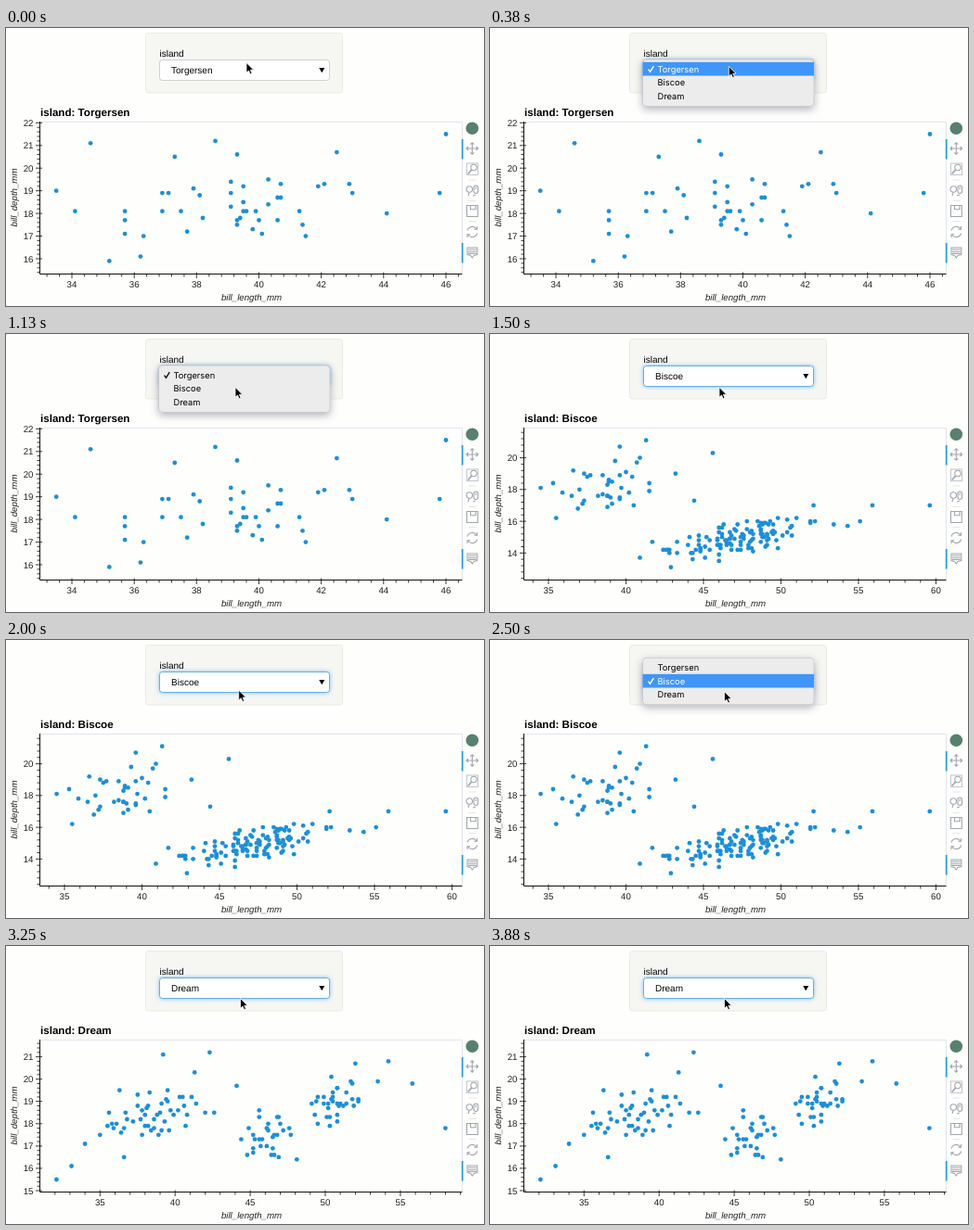
An HTML page that plays this animation: 515 by 300 pixels, repeating every 4.01 s.

```html
<!DOCTYPE html>
<html lang="en">
<head>
<meta charset="utf-8">
<title>Island scatter plot</title>
<style>
html, body { margin: 0; width: 100%; height: 100%; overflow: hidden; background: #fefefc; }
svg { display: block; width: 515px; height: 300px; text-rendering: geometricPrecision; }
text { font-family: "Liberation Sans", Arial, sans-serif; font-size: 10px; fill: #000; }
.title { font-size: 11.6px; font-weight: bold; }
.axis { font-size: 9.7px; font-style: italic; fill: #222; text-anchor: middle; }
.tick { font-size: 9.7px; fill: #222; }
.item { font-family: Inter, sans-serif; font-size: 9.3px; }
.icon { fill: none; stroke: #a1a6ae; stroke-width: 1.1; }
</style>
</head>
<body>
<svg viewBox="0 0 515 300">
  <defs>
    <filter id="shadow" x="-15%" y="-40%" width="130%" height="190%">
      <feDropShadow dx="0" dy="3" stdDeviation="4.5" flood-color="#10102a" flood-opacity=".3"/>
    </filter>
    <filter id="glow" x="-10%" y="-40%" width="120%" height="180%">
      <feDropShadow dx="0" dy="0" stdDeviation="1.9" flood-color="#66afe9" flood-opacity=".85"/>
    </filter>
  </defs>
  <rect width="515" height="300" fill="#fefefc"/>
  <rect x="150.5" y="5.5" width="212" height="64.5" rx="3" fill="#f6f6f3" stroke="#ebebe0"/>
  <text x="165.5" y="31">island</text>
  <rect id="box" x="165.5" y="34.5" width="183" height="22" rx="3" fill="#fff"/>
  <text id="value" x="178" y="49"></text>
  <path d="M337.3 43h6l-3 5.2z"/>

  <text id="title" class="title" x="37" y="95"></text>
  <path d="M37 101.5H491.5V265" fill="none" stroke="#e3e3ee"/>
  <g id="plot"></g>
  <path d="M36.5 101V265.5H491.5" fill="none" stroke="#111"/>
  <text class="axis" x="264.5" y="294">bill_length_mm</text>
  <text class="axis" transform="translate(11.5 183) rotate(-90)">bill_depth_mm</text>

  <path d="M491.7 120v21.5M491.7 232v21.5" stroke="#26a0da" stroke-width="1.8"/>
  <circle cx="502.3" cy="108.3" r="6.8" fill="#57806f"/>
  <path d="M498.5 164h8M498.5 186.5h8M498.5 208.5h8" stroke="#e6e6e8"/>
  <g class="icon">
    <path d="M496 130h12.6M502.3 123.7v12.6M498 128l-2 2 2 2M506.600 128l2 2-2 2M500.300 125.700l2-2 2 2M500.300 134.300l2 2 2-2"/>
    <rect x="496.500" y="146" width="12" height="12.500" stroke="#c4c8ce"/>
    <circle cx="504" cy="150.500" r="3.200"/><path d="M501.700 153l-4 4.500" stroke-width="1.800"/>
    <circle cx="499.300" cy="174" r="3.200"/><path d="M499 177.500l-1 3.500"/>
    <rect x="504" y="170" width="4.500" height="8.500" rx="2.200"/><path d="M506.200 171.500v2.500M503 181l3-1"/>
    <path d="M496.500 191.500h11.800v12h-11.800zM500.500 191.700v4h5.500v-4"/>
    <path d="M497 218.500a5.500 5.500 0 0 1 10-1.500M507.600 221.500a5.500 5.500 0 0 1-10 1.500M507.500 214v3.200h-3.200M497 226v-3.200h3.200"/>
    <path d="M497 237h10.800v7.500l-3.800 1-1.700 2.500-1.700-2.500-3.600-1zM498 239h8.800M498 241.200h8.800M498 243.400h8.800"/>
  </g>

  <g id="menu">
    <rect x="164.5" width="184.500" height="50.500" rx="4" fill="#ececec" stroke="#bfbfc4" stroke-width=".7" filter="url(#shadow)"/>
    <rect id="bar" x="164.500" width="184.500" height="14.700" fill="#3f95f8"/>
    <path id="check" fill="none" stroke-width="1.400"/>
    <g id="items"></g>
  </g>
  <path id="cursor" d="M0 0V10.800L2.500 8.500 4.200 12.300 6 11.500 4.400 7.800H7.800Z" fill="#000" stroke="#fff" stroke-width=".8"/>
</svg>
<script>
const LOOP = 4010, STEP = 125, ROW = 14.8;
const get = id => document.getElementById(id);

function random(seed) {
  return () => (seed = seed * 16807 % 2147483647) / 2147483647;
}

// Bell-shaped cloud: evenly ranked radii, random angles, depth rising with length
function cloud({ seed, count, mean, spread, slope }) {
  const rand = random(seed * 7919);
  return Array.from({ length: count }, (_, i) => {
    const r = Math.sqrt(-2 * Math.log(1 - 0.9 * (i + 0.5) / count));
    const angle = 2 * Math.PI * rand();
    const dx = spread[0] * r * Math.cos(angle);
    const dy = slope * dx + spread[1] * r * Math.sin(angle);
    return [mean[0] + dx, mean[1] + dy].map(v => Math.round(v * 10) / 10);
  });
}

// Axis: value at a known pixel, pixels per unit, major tick spacing
const plots = [
  {
    name: "Torgersen",
    x: { at: 34, px: 71, unit: 33.58, major: 2 },
    y: { at: 16, px: 249, unit: -24.45, major: 1 },
    clouds: [{ seed: 3, count: 39, mean: [39, 18.2], spread: [2.1, 0.9], slope: 0.05 }],
    outer: [[46, 21.5], [45.8, 18.9], [34.6, 21.1], [33.5, 19], [35.2, 15.9], [42.5, 20.7],
      [38.6, 21.2], [44.1, 18], [37.3, 20.5], [39.3, 20.6], [34.1, 18.1], [36.2, 16.1]]
  },
  {
    name: "Biscoe",
    x: { at: 35, px: 63, unit: 16.7, major: 5 },
    y: { at: 14, px: 236.3, unit: -17.12, major: 2 },
    clouds: [
      { seed: 5, count: 36, mean: [38.9, 18.2], spread: [1.9, 0.9], slope: 0.15 },
      { seed: 8, count: 112, mean: [47.2, 14.9], spread: [2.4, 0.6], slope: 0.2 }
    ],
    outer: [[45.6, 20.3], [41.3, 21.1], [39.6, 20.7], [34.5, 18.1], [35.5, 16.2], [43.2, 19],
      [59.6, 17], [55.9, 17], [55.1, 16], [54.3, 15.7], [53.4, 15.8], [52.1, 17],
      [44.4, 17.3], [40.9, 13.7], [42.9, 13.1], [41.7, 14.7]]
  },
  {
    name: "Dream",
    x: { at: 35, px: 101.3, unit: 16.18, major: 5 },
    y: { at: 15, px: 264, unit: -24.07, major: 1 },
    clouds: [
      { seed: 4, count: 48, mean: [38.6, 18.1], spread: [1.9, 0.75], slope: 0.15 },
      { seed: 6, count: 29, mean: [46.3, 17.6], spread: [1.1, 0.6], slope: 0.15 },
      { seed: 9, count: 33, mean: [50.9, 19], spread: [0.95, 0.6], slope: 0.15 }
    ],
    outer: [[32.1, 15.5], [33.1, 16.1], [34, 17.1], [39.2, 21.1], [42.3, 21.2], [41.3, 20.3],
      [36.3, 19.5], [44.1, 19.7], [48.1, 16.4], [58, 17.8], [55.8, 19.8], [54.2, 20.8],
      [53.5, 19.9], [52, 20.7]]
  }
];

const place = (axis, v) => axis.px + (v - axis.at) * axis.unit;

function ticks(axis, lo, hi, draw) {
  for (let i = -30; i <= 60; i++) {
    const v = axis.at + i * axis.major / 5, p = place(axis, v);
    if (p >= lo && p <= hi) draw(p.toFixed(1), i % 5 === 0, Math.round(v));
  }
}

function plotMarkup({ x, y, clouds, outer }) {
  let lines = "", marks = "";
  ticks(x, 37, 491.5, (p, major, v) => {
    lines += major ? `M${p} 263.5V270` : `M${p} 265V268.5`;
    if (major) marks += `<text class="tick" text-anchor="middle" x="${p}" y="279.5">${v}</text>`;
  });
  ticks(y, 101, 265, (p, major, v) => {
    lines += major ? `M32 ${p}H39` : `M33.5 ${p}H37`;
    if (major) marks += `<text class="tick" text-anchor="end" x="29.5" y="${+p + 3.5}">${v}</text>`;
  });
  for (const [a, b] of [...outer, ...clouds.flatMap(cloud)]) {
    marks += `<circle cx="${place(x, a).toFixed(1)}" cy="${place(y, b).toFixed(1)}" r="2.4" fill="#1f8fd6"/>`;
  }
  return `<path d="${lines}" stroke="#222" stroke-width=".9"/>` + marks;
}

plots.forEach(p => p.markup = plotMarkup(p));
get("items").innerHTML = plots.map((p, i) =>
  `<text class="item" x="180.5" y="${13.6 + i * ROW}">${p.name}</text>`).join("");
const items = [...get("items").children];

// start, chosen island, menu open, highlighted row (-1: none)
const states = [
  [0, 0, false, -1], [250, 0, true, 0], [750, 0, true, 1], [1125, 0, true, -1],
  [1250, 1, false, -1], [2375, 1, true, 1], [2625, 1, true, 2], [3000, 1, true, -1],
  [3125, 2, false, -1]
];
// time, x, y
const pointer = [
  [0, 259, 37.5], [500, 257, 42], [750, 247, 57.5], [1750, 247, 57.5],
  [2125, 252, 53], [2500, 252.5, 55.7], [3000, 252.5, 56.5], [LOOP, 252.5, 56.5]
];

function pointerAt(t) {
  const i = pointer.findIndex(k => k[0] > t);
  const [t0, x0, y0] = pointer[i - 1], [t1, x1, y1] = pointer[i];
  const u = (t - t0) / (t1 - t0), e = u * u * (3 - 2 * u);
  return [x0 + (x1 - x0) * e, y0 + (y1 - y0) * e];
}

let shownPlot = -1, shownState = null;

function showState([start, chosen, open, row]) {
  if (chosen !== shownPlot) {
    shownPlot = chosen;
    get("plot").innerHTML = plots[chosen].markup;
    get("title").textContent = "island: " + plots[chosen].name;
    get("value").textContent = plots[chosen].name;
  }
  const focus = start > 0;
  get("box").setAttribute("stroke", focus ? "#66afe9" : "#cfcfcf");
  get("box").setAttribute("filter", focus ? "url(#glow)" : "none");
  get("menu").setAttribute("display", open ? "inline" : "none");
  get("menu").setAttribute("transform", `translate(0 ${34 - chosen * ROW})`);
  get("bar").setAttribute("display", row < 0 ? "none" : "inline");
  get("bar").setAttribute("y", 2.8 + row * ROW);
  get("check").setAttribute("d", `M170.5 ${10.6 + chosen * ROW}l2 2.6 3.8-6`);
  get("check").setAttribute("stroke", row === chosen ? "#fff" : "#111");
  items.forEach((el, i) => el.style.fill = i === row ? "#fff" : "#000");
}

function render(ms) {
  const t = Math.min(31, Math.floor((ms % LOOP + 6) / STEP)) * STEP;
  const state = states.filter(s => s[0] <= t).pop();
  if (state !== shownState) showState(shownState = state);
  get("cursor").setAttribute("transform", `translate(${pointerAt(t).join(" ")})`);
}

const begin = performance.now();
function tick() {
  render(performance.now() - begin);
  requestAnimationFrame(tick);
}
tick();
</script>
</body>
</html>
```
